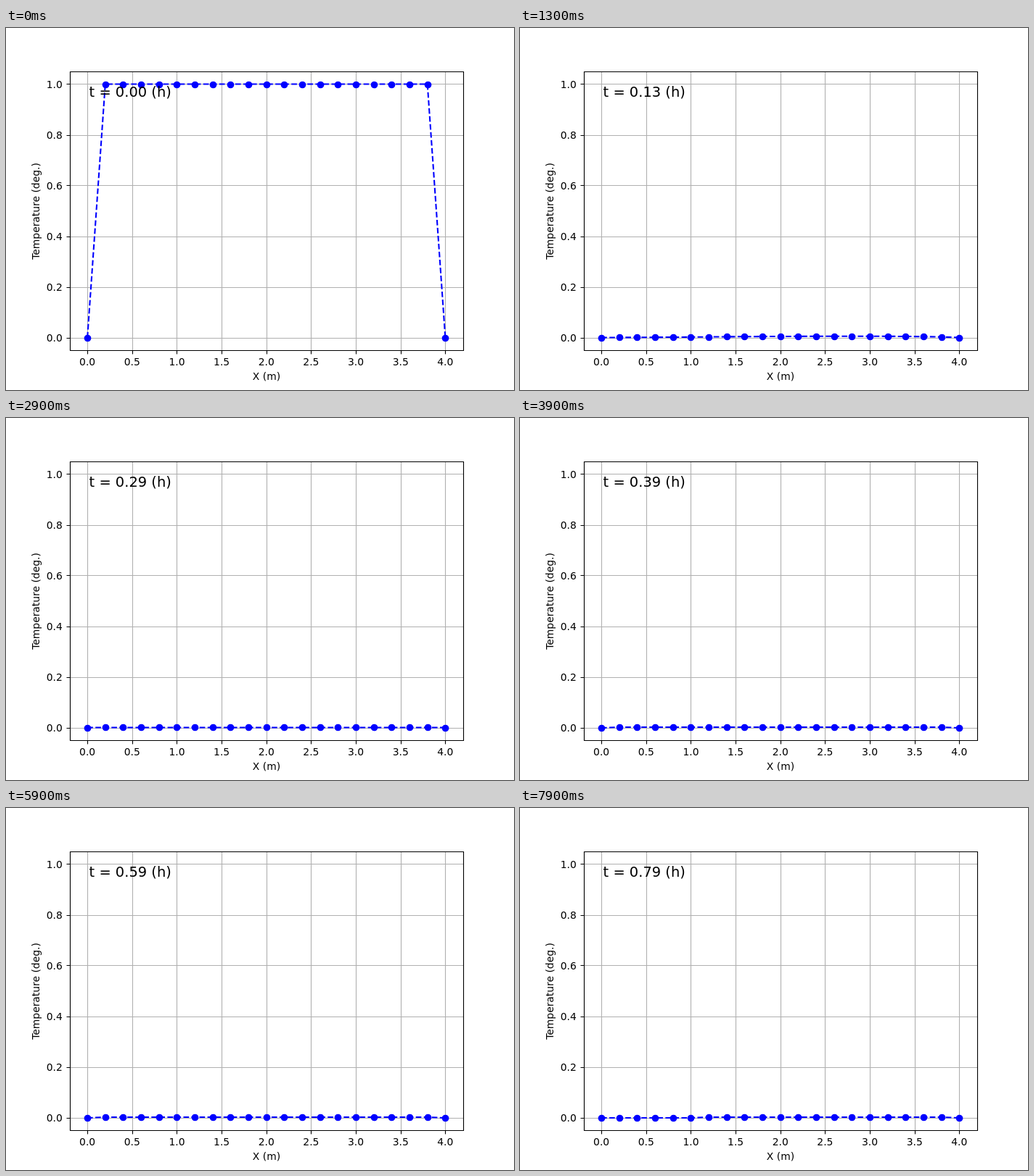
Animation of 700 by 500 pixels, one loop 8000 ms. Source, as an HTML page:

```html
<!DOCTYPE html>
<html lang="en">
<head>
<meta charset="utf-8">
<title>Temperature profile</title>
<style>
  html, body { margin: 0; width: 100%; height: 100%; overflow: hidden; background: #fff; }
  svg { display: block; width: 700px; height: 500px; }
  text { font: 13.89px "DejaVu Sans", sans-serif; fill: #000; white-space: pre; }
  .mid { text-anchor: middle; }
  .end { text-anchor: end; }
  #clock { font-size: 19.44px; }
  #grid, #frame { fill: none; stroke: #b0b0b0; stroke-width: 1.11; }
  #frame { stroke: #000; }
  #curve { fill: none; stroke: #00f; stroke-width: 2.083; stroke-dasharray: 7.708 3.333; stroke-linejoin: round; }
  circle { fill: #00f; }
</style>
</head>
<body>
<svg viewBox="0 0 700 500">
  <path id="grid"/>
  <polyline id="curve"/>
  <g id="dots"></g>
  <path id="frame"/>
  <g id="labels"></g>
  <text class="mid" x="359" y="486">X (m)</text>
  <text class="mid" transform="translate(46 253) rotate(-90)">Temperature (deg.)</text>
  <text id="clock" x="114.6" y="95"></text>
</svg>
<script>
const FRAMES = 80, STEP_MS = 100, NODES = 21, DX = 0.2;
const ZERO_Y = 427.5, UNIT_Y = 350;
const $ = id => document.getElementById(id);
const toX = x => 87.5 + (x + 0.2) * 542.5 / 4.4;
const snap = v => Math.floor(v + 0.5);

function add(parent, tag, attrs, text = "") {
  const el = document.createElementNS("http://www.w3.org/2000/svg", tag);
  for (const key in attrs) el.setAttribute(key, attrs[key]);
  el.textContent = text;
  return parent.appendChild(el);
}

function drawAxes() {
  let grid = "", frame = "M88.5 60.5H630.5V445.5H88.5Z";
  for (let i = 0; i <= 8; i++) {
    const x = snap(toX(i / 2)) + 0.5;
    grid += `M${x} 60.5V445.5`;
    frame += `M${x} 445.5V450.5`;
    add($("labels"), "text", { class: "mid", x: toX(i / 2), y: 466 }, (i / 2).toFixed(1));
  }
  for (let i = 0; i <= 5; i++) {
    // ticks at 0.6 and 1.0 round to the upper pixel row
    const y = 428.5 - 70 * i - (i === 3 || i === 5 ? 1 : 0);
    grid += `M88.5 ${y}H630.5`;
    frame += `M83.5 ${y}H88.5`;
    add($("labels"), "text", { class: "end", x: 77.8, y: 433 - 70 * i }, (i / 5).toFixed(1));
  }
  $("grid").setAttribute("d", grid);
  $("frame").setAttribute("d", frame);
}

// Advection, diffusion and decay with both ends held at zero
function simulate() {
  const speed = 7.2, diffusion = 2.8, decay = 40, dt = 0.0005;
  let temp = Array.from({ length: NODES }, (_, i) => i % (NODES - 1) ? 1 : 0);
  const states = [temp];
  while (states.length < FRAMES) {
    for (let n = 0; n < 20; n++) {
      temp = temp.map((v, i) => {
        if (i % (NODES - 1) === 0) return 0;
        const l = temp[i - 1], r = temp[i + 1];
        return v + dt * (diffusion * (l - 2 * v + r) / DX ** 2 - speed * (r - l) / (2 * DX) - decay * v);
      });
    }
    states.push(temp);
  }
  return states;
}

const states = simulate();
const last = states[FRAMES - 1];
const tiny = Math.sqrt(last[5] * last[6]); // below this a value rounds to zero

function pixelRow(v) {
  const y = snap(ZERO_Y - UNIT_Y * v);
  return y === 428 && v > tiny ? 427 : y;
}

drawAxes();
const xs = Array.from({ length: NODES }, (_, i) => toX(i * DX));
const dots = xs.map(x => add($("dots"), "circle", { cx: snap(x) + 0.5, r: 4.86 }));

let shown = -1;
function render() {
  const step = Math.floor(performance.now() / STEP_MS) % FRAMES;
  if (step !== shown) {
    shown = step;
    const temp = states[step];
    const flat = temp.every((v, i) => !i || Math.abs(v - temp[i - 1]) * UNIT_Y < 1e-4);
    const points = temp.map((v, i) => flat
      ? [snap(xs[i]), pixelRow(v)]
      : [xs[i], ZERO_Y - UNIT_Y * v]);
    $("curve").setAttribute("points", points.join(" "));
    dots.forEach((dot, i) => dot.setAttribute("cy", pixelRow(temp[i]) + 0.5));
    $("clock").textContent = `t = ${(step / 100).toFixed(2)} (h)`;
  }
  requestAnimationFrame(render);
}
render();
</script>
</body>
</html>
```
